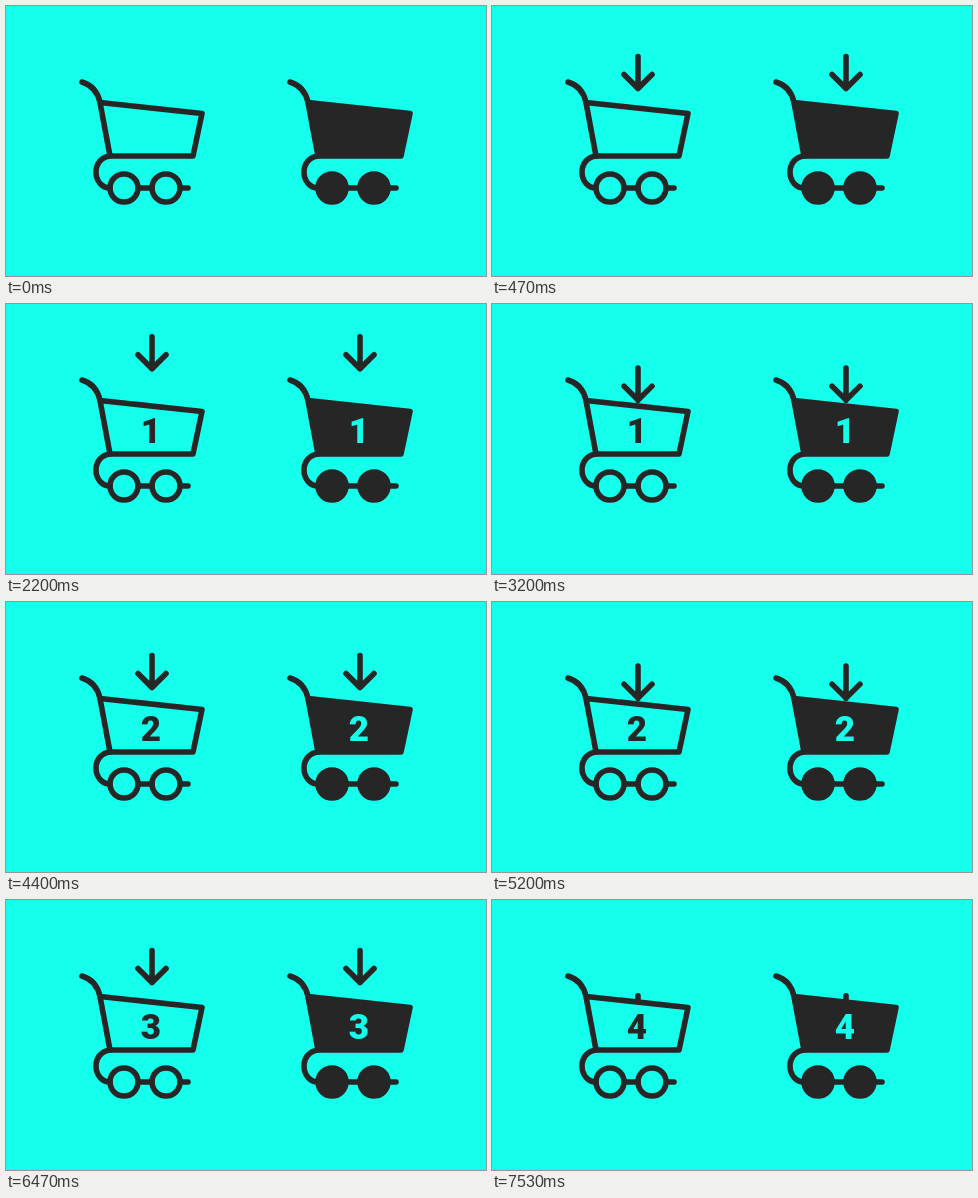
An HTML page that plays this animation: 480x270 px, repeating every 8000 ms.

```html
<!DOCTYPE html>
<html lang="en">
<head>
<meta charset="utf-8">
<title>Cart counter</title>
<style>
  html, body { margin: 0; width: 100%; height: 100%; overflow: hidden; background: #14ffec; }
  svg { display: block; width: 100%; height: 100%; }
  .line { fill: none; stroke: #262626; stroke-width: 5.6; stroke-linecap: round; stroke-linejoin: round; }
  .solid .body { fill: #262626; }
  .count { font: 900 35px Roboto, sans-serif; text-anchor: middle; fill: #262626; }
  .solid .count { fill: #14ffec; }
</style>
</head>
<body>
<svg viewBox="0 0 480 270">
  <defs>
    <clipPath id="above"><path d="M94 0H197V107.5L94 96.5Z"/></clipPath>
    <g id="arrow" class="line"><path d="M146 50V82M132 68L146 82L160 68"/></g>
    <g id="cart" class="line">
      <path d="M76 76C86 79 92 87 94 96.5M104 150C95 151 90 158 90 166C90 175 96 182 104 182M132 182H146M174 182H182"/>
      <path class="body" d="M94 96.5L196 107.5L187 150H104Z"/>
      <circle class="body" cx="118" cy="182" r="14"/>
      <circle class="body" cx="160" cy="182" r="14"/>
    </g>
  </defs>
  <g id="outline"></g>
  <g id="filled" class="solid" transform="translate(208)"></g>
</svg>
<script>
const LOOP = 8000, CYCLE = 2000, FPS = 15;
const DROP_START = 867, DROP_END = 1530, COUNT_AT = 1467;

const cartMarkup = document.getElementById('cart').outerHTML.replace(' id="cart"', '');
const arrowMarkup = document.getElementById('arrow').outerHTML.replace('id="arrow" class="line"', 'class="line arrow"');
for (const id of ['outline', 'filled']) {
  document.getElementById(id).innerHTML =
    `<g clip-path="url(#above)">${arrowMarkup}</g>${cartMarkup}<text class="count" x="145" y="139"></text>`;
}
const arrows = document.querySelectorAll('.arrow');
const counts = document.querySelectorAll('.count');

const easeInOut = p => (1 - Math.cos(Math.PI * p)) / 2;
const easeIn = p => p * p;

// start, end, from, to, easing
const moves = [
  [0, 300, -90, 7, easeInOut],
  [300, 500, 7, 0, easeInOut],
  [500, DROP_START, 0, 0, easeIn],
  [DROP_START, DROP_END, 0, 56, easeIn]
];

function arrowOffset(t) {
  const move = moves.find(([, end]) => t < end);
  if (!move) return null;
  const [start, end, from, to, ease] = move;
  return from + (to - from) * ease((t - start) / (end - start));
}

function draw(time) {
  const t = Math.floor((time % LOOP) * FPS / 1000 + 0.01) * 1000 / FPS;
  const offset = arrowOffset(t % CYCLE);
  const count = Math.floor((t + CYCLE - COUNT_AT + 1) / CYCLE);
  arrows.forEach(el => {
    el.style.display = offset === null ? 'none' : '';
    el.setAttribute('transform', `translate(0 ${offset || 0})`);
  });
  counts.forEach(el => { el.textContent = count || ''; });
}

const begin = performance.now();
function tick() {
  draw(performance.now() - begin);
  requestAnimationFrame(tick);
}
tick();
</script>
</body>
</html>
```
